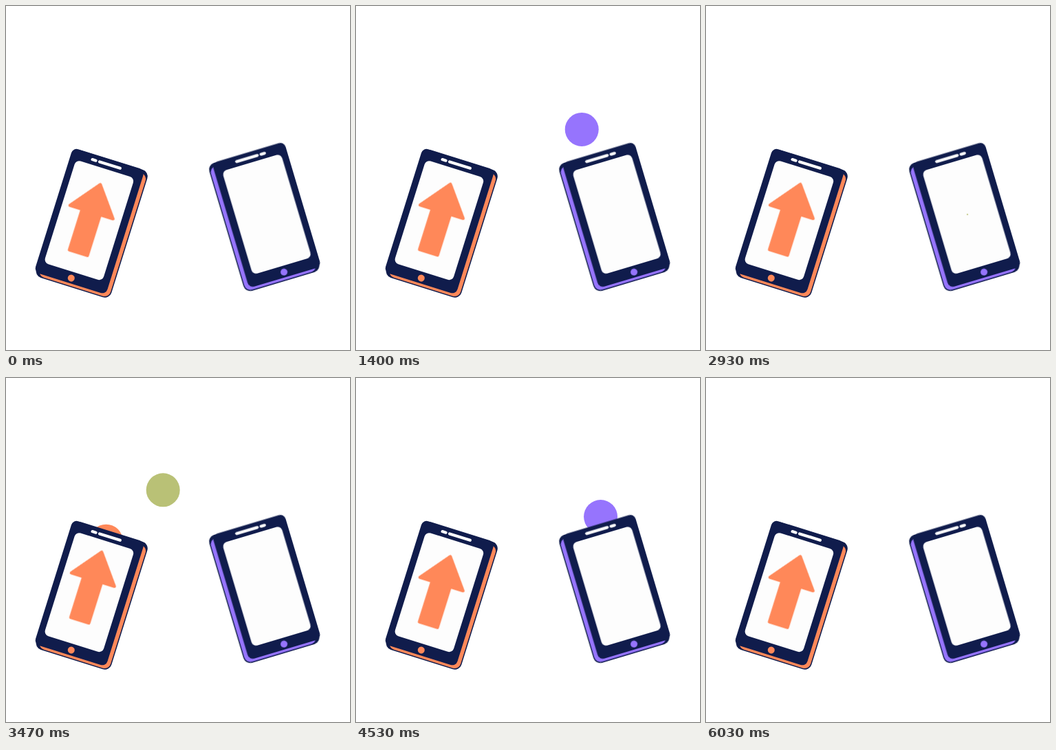
An HTML page for the animation above (6.06 s loop, 500 by 500 pixels).

```html
<!DOCTYPE html>
<html lang="en">
<head>
<meta charset="utf-8">
<title>Phone to phone transfer</title>
<style>
  :root {
    --navy: #101c4c;
    --orange: #ff8859;
    --purple: #9674fd;
    --green: #b9c176;
    --cycle: 3030ms;
  }
  html, body { margin: 0; width: 100%; height: 100%; overflow: hidden; background: #fff; }
  svg { display: block; width: 100vw; height: 100vh; }

  .ball {
    offset-path: path("M133 273 C138 258 143 243 149 228 C164 190 198 161.5 245 161.5 C275 161.5 306 164 329 180 C339 187 348 194 356 202 C368 214 378 232 388 256");
    offset-rotate: 0deg;
    animation: fly var(--cycle) linear infinite both;
  }
  .second { animation-delay: 333ms; }
  .third { animation-delay: 667ms; }
  @keyframes fly {
    0% { offset-distance: 0%; }
    33.5%, 100% { offset-distance: 100%; }
  }

  .arrow { animation: bob calc(var(--cycle) / 4) cubic-bezier(.37, 0, .63, 1) infinite alternate; }
  @keyframes bob {
    from { transform: translateY(0); }
    to { transform: translateY(-10.8px); }
  }

  .tick { animation: pop var(--cycle) ease-in-out infinite; }
  @keyframes pop {
    0%, 53% { transform: scale(0); }
    64%, 88% { transform: scale(1); }
    98%, 100% { transform: scale(0); }
  }
</style>
</head>
<body>
<svg viewBox="0 0 500 500">
  <defs>
    <g id="phone">
      <rect x="-52" y="-96" width="114.5" height="194" rx="10" fill="var(--navy)"/>
      <rect x="-47" y="-91" width="108" height="187.5" rx="9" fill="currentColor"/>
      <rect x="-54" y="-96.5" width="109.5" height="189.5" rx="8" fill="var(--navy)"/>
      <rect x="-44.5" y="-81" width="89.3" height="157" rx="7" fill="#fdfdfd"/>
      <rect x="-24" y="-90.5" width="9.5" height="4.2" rx="2.1" fill="#fff"/>
      <rect x="-13" y="-90.5" width="35.5" height="4.2" rx="2.1" fill="#fff"/>
      <circle cx=".3" cy="85.3" r="5" fill="currentColor"/>
    </g>
  </defs>

  <circle class="ball" r="24.5" fill="var(--green)"/>
  <circle class="ball second" r="24.5" fill="var(--orange)"/>
  <circle class="ball third" r="24.5" fill="var(--purple)"/>

  <g transform="translate(120 314) rotate(17.4)">
    <use href="#phone" color="var(--orange)"/>
    <path class="arrow" d="M0 -57 L32.5 -15 H13 V47 H-14.5 V-15 H-33 Z"
      fill="var(--orange)" stroke="var(--orange)" stroke-width="4.5" stroke-linejoin="round"/>
  </g>

  <use href="#phone" color="var(--purple)" transform="translate(380 305) scale(-1 1) rotate(16.6)"/>

  <g transform="translate(380 303)">
    <g class="tick">
      <circle r="34.5" fill="var(--green)"/>
      <path d="M-17.5 5 L0 17 L11.5 -21" fill="none" stroke="#fff" stroke-width="5.5"
        stroke-linecap="round" stroke-linejoin="round"/>
    </g>
  </g>
</svg>
</body>
</html>
```
